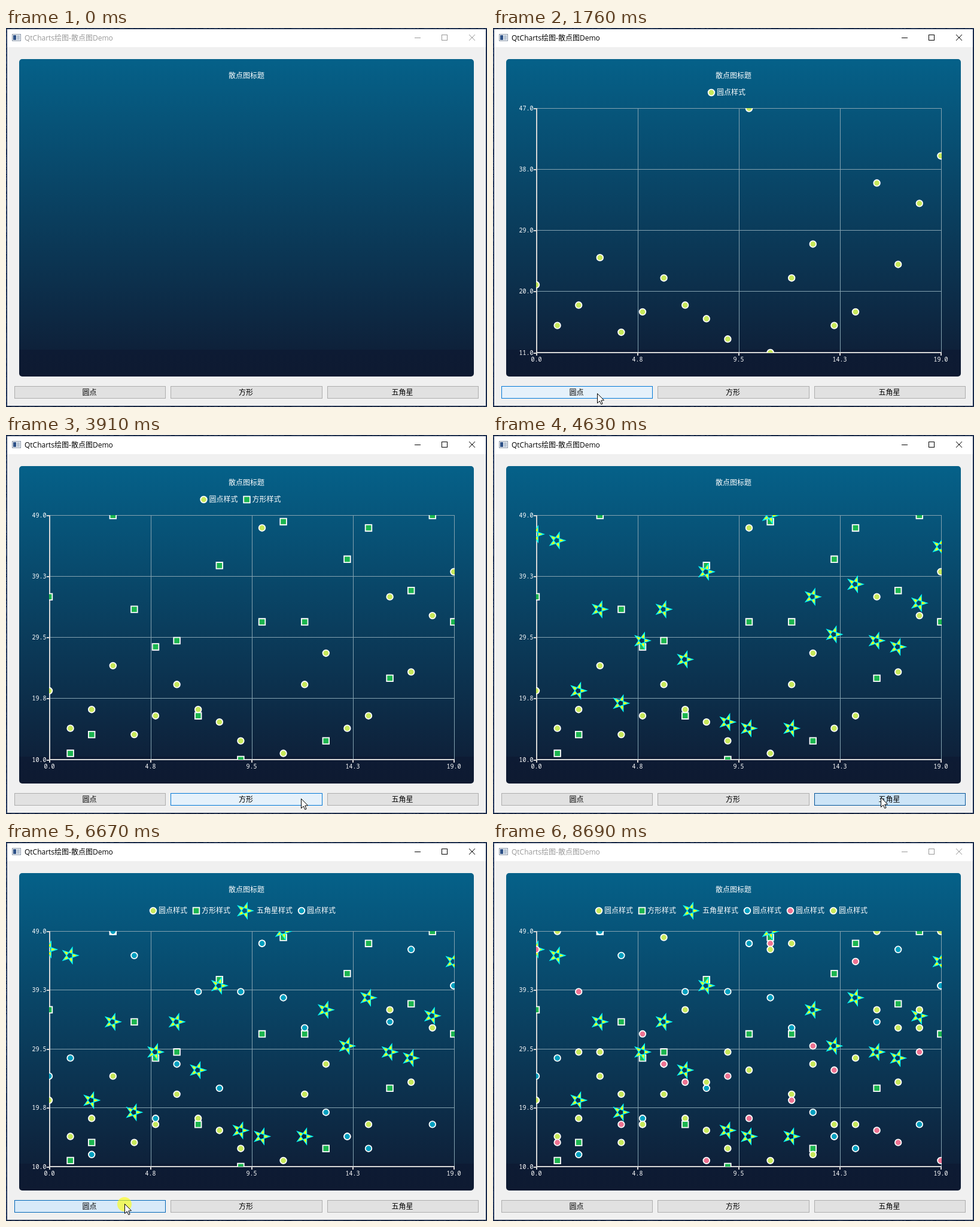
Write an HTML page with a canvas that moves like this. It is 804 px wide and 634 px high and loops after 8.82 s.

```html
<!DOCTYPE html>
<html lang="zh">
<head>
<meta charset="utf-8">
<style>
html, body { margin: 0; width: 100%; height: 100%; overflow: hidden; background: #f0f0f0; }
canvas { display: block; }
</style>
</head>
<body>
<canvas id="stage" width="804" height="634"></canvas>
<script>
const ctx = document.getElementById('stage').getContext('2d');
const LOOP = 8820;
const CJK = '"Noto Sans CJK SC", "Noto Sans CJK JP", "Noto Sans CJK", sans-serif';
const LABEL = '12px ' + CJK;
const CAPTION = '12px "Open Sans", ' + CJK;
const DIGITS = '10px "Noto Sans Mono", monospace';

const SERIES = [
  { kind: 'dot', color: '#c7e85b', values: [21,15,18,25,14,17,22,18,16,13,47,11,22,27,15,17,36,24,33,40] },
  { kind: 'square', color: '#1cb54f', values: [36,11,14,49,34,28,29,17,41,10,32,48,32,13,42,47,23,37,49,32] },
  { kind: 'star', color: '#ffff00', values: [46,45,21,34,19,29,34,26,40,16,15,49,15,36,30,38,29,28,35,44] },
  { kind: 'dot', color: '#009fbf', values: [25,28,12,49,45,18,27,39,23,39,47,38,33,19,15,13,34,46,17,40] },
  { kind: 'dot', color: '#ee7392', values: [46,14,39,29,17,32,27,24,11,25,18,47,21,30,26,44,16,14,29,11] },
  { kind: 'dot', color: '#c7e85b', values: [21,49,29,29,22,17,48,36,24,29,26,46,47,12,17,28,49,33,36,49] }
];
const NAMES = { dot: '圆点样式', square: '方形样式', star: '五角星样式' };

// Each click adds the next series on release; its legend follows one step later.
const CLICKS = [
  { down: 1000, up: 1130, button: 0 },
  { down: 2970, up: 3100, button: 1 },
  { down: 4440, up: 4630, button: 2 },
  { down: 5910, up: 6100, button: 0 },
  { down: 6670, up: 6800, button: 0 },
  { down: 7310, up: 7440, button: 0 }
];
const LEGEND_DELAY = 65;

const BUTTONS = [
  { x: 14, w: 253, text: '圆点', hovers: [[680, 1960], [5400, 7890]] },
  { x: 275, w: 254, text: '方形', hovers: [[230, 400], [2200, 3910], [5150, 5390]] },
  { x: 537, w: 253, text: '五角星', hovers: [[3960, 5150]] }
];

const MOVES = [
  { from: 230, to: 820, steps: 10, path: [[425, 614], [310, 596], [215, 590], [166, 612]] },
  { from: 1760, to: 2350, steps: 10, path: [[174, 611], [300, 594], [400, 601], [428, 602]] },
  { from: 2660, to: 2860, steps: 4, path: [[426, 602], [416, 605]] },
  { from: 3730, to: 4170, steps: 8, path: [[430, 606], [540, 609], [648, 606]] },
  { from: 5070, to: 5450, steps: 7, path: [[630, 606], [400, 603], [272, 603], [247, 604]] },
  { from: 5520, to: 5730, steps: 4, path: [[232, 604], [205, 605], [198, 605]] },
  { from: 7820, to: 8130, steps: 6, path: [[205, 606], [280, 618], [332, 625], [345, 640]] }
];

const clamp = v => Math.max(0, Math.min(1, v));
const lerp = (a, b, u) => a + (b - a) * u;
const mix = (a, b, u) => a.map((v, i) => lerp(v, b[i], u));
const rgb = c => `rgb(${c.map(Math.round)})`;

function rect(x, y, w, h, color) {
  ctx.fillStyle = color;
  ctx.fillRect(x, y, w, h);
}

function text(str, x, y, font, color, align = 'left') {
  ctx.font = font;
  ctx.fillStyle = color;
  ctx.textAlign = align;
  ctx.fillText(str, x, y);
}

function polyline(points) {
  ctx.beginPath();
  points.forEach(([x, y]) => ctx.lineTo(x, y));
}

function drawDesktop() {
  rect(0, 0, 804, 634, '#17294b');
  let seed = 7;
  const random = () => (seed = seed * 16807 % 2147483647) / 2147483647;
  for (let y = 0; y < 634; y += 2) {
    const v = random() * 60 * (y < 400 ? 1 : 0.6);
    rect(0, y, 1, 2, rgb([30 + v, 50 + v, 90 + v]));
  }
  for (let x = 0; x < 804; x += 3) {
    const v = random() * 40;
    rect(x, 0, 3, 1, rgb([20 + v, 36 + v, 62 + v]));
    rect(x, 633, 3, 1, rgb([18 + v, 30 + v, 52 + v]));
  }
}

function drawWindow(active) {
  drawDesktop();
  rect(2, 2, 800, 630, '#f0f0f0');
  rect(2, 2, 800, 30, '#ffffff');

  rect(10, 10, 15, 12, '#8a97a8');
  rect(11, 11, 13, 10, '#f4f6f8');
  rect(12, 12, 5, 8, '#2f5288');
  rect(18, 12, 5, 8, '#b9c6d6');

  const ink = active ? '#000000' : '#999999';
  text('QtCharts绘图-散点图Demo', 31, 21, CAPTION, ink);
  ctx.strokeStyle = ink;
  ctx.lineWidth = 1;
  rect(683, 16, 10, 1, ink);
  ctx.strokeRect(728.5, 11.5, 9, 9);
  ctx.beginPath();
  ctx.moveTo(774, 11);
  ctx.lineTo(784, 21);
  ctx.moveTo(784, 11);
  ctx.lineTo(774, 21);
  ctx.stroke();
}

function drawPanel() {
  const shade = ctx.createLinearGradient(0, 52, 0, 583);
  shade.addColorStop(0, '#056189');
  shade.addColorStop(0.915, '#0e213a');
  shade.addColorStop(0.915, '#0d1b34');
  shade.addColorStop(1, '#0e1a31');
  ctx.fillStyle = shade;
  ctx.beginPath();
  ctx.roundRect(22, 52, 760, 531, 5);
  ctx.fill();
  text('散点图标题', 402, 84, LABEL, '#ffffff', 'center');
}

function drawMarker({ kind, color }, x, y) {
  ctx.fillStyle = color;
  ctx.strokeStyle = '#ffffff';
  ctx.lineWidth = 1.8;
  ctx.beginPath();
  if (kind === 'dot') {
    ctx.arc(x, y, 5.3, 0, Math.PI * 2);
  } else if (kind === 'square') {
    ctx.rect(x - 5.3, y - 5.3, 10.6, 10.6);
  } else {
    ctx.strokeStyle = '#00ffff';
    ctx.lineWidth = 1.3;
    for (let i = 0; i < 5; i++) {
      const a = 0.8 * i * Math.PI;
      ctx.lineTo(x - 1 + 14 * Math.cos(a), y + 14 * Math.sin(a));
    }
    ctx.closePath();
  }
  ctx.fill('evenodd');
  ctx.stroke();
}

function drawLegend(series) {
  const stars = series.filter(s => s.kind === 'star').length;
  const y = stars ? 115 : 108;
  let x = 392.5 - 34.5 * (series.length - stars) - 50 * stars;
  for (const s of series) {
    const star = s.kind === 'star';
    drawMarker(s, x + (star ? 17 : 7), y);
    text(NAMES[s.kind], x + (star ? 36 : 16), y + 4, LABEL, '#ffffff');
    x += star ? 104 : 72;
  }
}

function drawPlot(series, top) {
  const bottom = 543;
  const all = series.flatMap(s => s.values);
  const min = Math.min(...all), max = Math.max(...all);
  const axis = '#d6d6d6', grid = '#84a2b0';

  for (let k = 0; k < 5; k++) {
    const x = 73 + 169 * k;
    const y = Math.floor(lerp(top, bottom, k / 4));
    if (k > 0) rect(x, top, 1, bottom - top, grid);
    if (k < 4) rect(73, y, 677, 1, grid);
    rect(x - 1, 544, 2, 4, axis);
    rect(68, y, 4, 2, axis);
    text(lerp(max, min, k / 4).toFixed(1), 67.5, y + 4, DIGITS, '#ffffff', 'right');
    text((4.75 * k).toFixed(1), x - 0.5, 558, DIGITS, '#ffffff', 'center');
  }
  rect(72, top, 2, bottom - top + 1, axis);
  rect(72, 542, 678, 2, axis);

  ctx.save();
  ctx.beginPath();
  ctx.rect(72, top, 678, bottom - top);
  ctx.clip();
  for (const s of series) {
    s.values.forEach((v, i) => drawMarker(s, 72 + i * 35.6, lerp(bottom, top + 0.5, (v - min) / (max - min))));
  }
  ctx.restore();
}

function drawChart(t) {
  drawPanel();
  const shown = CLICKS.filter(c => t >= c.up).length;
  if (!shown) return;
  const settled = CLICKS.filter(c => t >= c.up + LEGEND_DELAY).length;
  drawPlot(SERIES.slice(0, shown), settled > 2 ? 149 : 134);
  if (settled === shown) drawLegend(SERIES.slice(0, shown));
}

function drawButton(button, index, t) {
  const fade = ([on, off]) => t < off ? clamp((t - on) / 160) : clamp(1 - (t - off) / 160);
  const press = c => {
    if (c.button !== index || t < c.down) return 0;
    const release = c.up + LEGEND_DELAY;
    return t < release ? clamp((t - c.down + 45) / 90) : clamp(1 - (t - release + 40) / 160);
  };
  const hover = Math.max(...button.hovers.map(fade));
  const pressed = Math.max(...CLICKS.map(press));
  const fill = mix(mix([225, 225, 225], [229, 241, 251], hover), [204, 228, 247], pressed);
  const edge = mix(mix([173, 173, 173], [0, 120, 215], hover), [0, 84, 153], pressed);
  rect(button.x, 599, button.w, 21, rgb(edge));
  rect(button.x + 1, 600, button.w - 2, 19, rgb(fill));
  text(button.text, button.x + button.w / 2 - 1, 614, LABEL, '#000000', 'center');
}

function cursorAt(t) {
  const move = MOVES.filter(m => t >= m.from).pop();
  if (!move) return null;
  const { from, to, steps, path } = move;
  const last = steps - 1;
  const step = Math.min(last, Math.floor((t - from) / (to - from) * last + 1e-6));
  const p = step / last * (path.length - 1);
  const i = Math.min(path.length - 2, Math.floor(p));
  return mix(path[i], path[i + 1], p - i).map(Math.round);
}

function drawCursor(t) {
  const pos = cursorAt(t);
  if (!pos) return;
  const [x, y] = pos;
  if (CLICKS.some(c => t >= c.down && t < c.up)) {
    ctx.fillStyle = 'rgba(255, 255, 0, 0.6)';
    ctx.beginPath();
    ctx.arc(x, y + 1, 12, 0, Math.PI * 2);
    ctx.fill();
  }
  ctx.save();
  ctx.translate(x + 0.5, y + 0.5);
  polyline([[0, 0], [0, 16], [3.7, 12.5], [6.3, 18], [8.6, 17], [6.2, 11.6], [11, 11.2]]);
  ctx.closePath();
  ctx.fillStyle = '#ffffff';
  ctx.strokeStyle = '#000000';
  ctx.lineWidth = 1;
  ctx.fill();
  ctx.stroke();
  ctx.restore();
}

function render() {
  const t = performance.now() % LOOP;
  drawWindow(t >= 1000 && t < 8690);
  drawChart(t);
  BUTTONS.forEach((b, i) => drawButton(b, i, t));
  drawCursor(t);
  requestAnimationFrame(render);
}
render();
</script>
</body>
</html>
```
